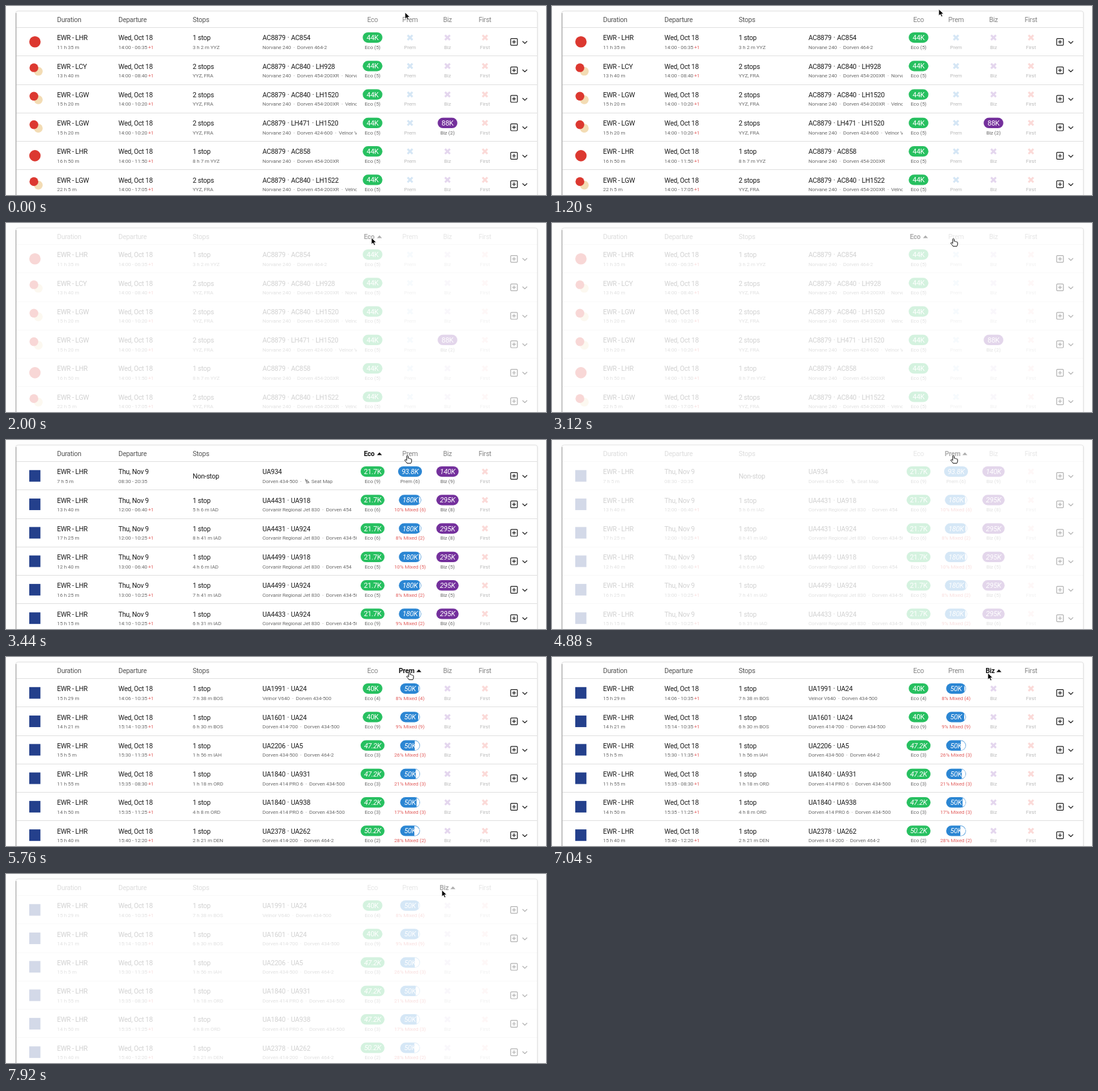
Recreate the animation shown at these times as an HTML page. Size 836 px wide and 294 px high, loop 8000 ms.

```html
<!DOCTYPE html>
<html lang="en">
<head>
<meta charset="utf-8">
<title>Flight results sorting</title>
<style>
  html, body { margin: 0; width: 100%; height: 100%; overflow: hidden; background: #fdfdfd; }
  svg { display: block; width: 836px; height: 294px; }
  text { font: 10.5px Roboto, sans-serif; letter-spacing: -.25px; fill: #1c1c1c; white-space: pre; }
  .sub { font-size: 8px; letter-spacing: -.1px; fill: #6c6c6c; }
  .mid { text-anchor: middle; }
  .plus, .mixed { fill: #e2605f; }
  .flights { word-spacing: .6px; }
  .head { fill: #555; }
  .cabin { fill: #858585; }
  .sorted { font-weight: 700; fill: #111; }
  .off { fill: #bcbcbc; }
  .price { fill: #fff; font-size: 11px; }
  .it { font-style: italic; }
  .line { stroke: #e0e0e0; }
  .icon { fill: none; stroke: #222; stroke-width: 1.2; }
</style>
</head>
<body>
<svg viewBox="0 0 836 294">
  <defs>
    <clipPath id="planes"><rect x="390" y="0" width="153" height="294"/></clipPath>
    <filter id="soft" x="-5%" y="-5%" width="110%" height="110%"><feGaussianBlur stdDeviation="1.2"/></filter>
  </defs>
  <rect x="15.5" y="8.5" width="807" height="310" rx="3" fill="#999" opacity=".45" filter="url(#soft)"/>
  <rect x="15.5" y="8" width="807" height="310" rx="3" fill="#fff" stroke="#dedede" stroke-width=".8"/>
  <path d="M15.6 11V294" stroke="#9a9a9a"/>
  <g id="body"></g>
  <rect id="veil" x="16.2" y="8.6" width="805.8" height="290" rx="2.5" fill="#fff"/>
  <g id="top"></g>
  <g id="cursor" stroke-linejoin="round">
    <path id="arrow" transform="translate(.8 1)" d="M0 0V10.2L2.4 8L4.1 11.8L5.9 11L4.2 7.3H7.5Z" fill="#000" stroke="#fff" stroke-width=".8"/>
    <path id="hand" d="M-1.2 1Q0-.6 1.1 1V4.4Q2.4 3.7 3 4.9Q4.4 4.4 4.8 5.5Q6.3 5.1 6.4 6.8V9Q6.2 10.6 5.3 12.2H-.6Q-1.6 10.4-3.8 8.2Q-4.6 6.8-3.2 6.6Q-2.2 6.6-1.2 7.8Z" fill="#fff" stroke="#111" stroke-width="1"/>
  </g>
</svg>
<script>
const $ = id => document.getElementById(id);
const LOOP = 8000, HEAD = 33.5, PITCH = 44.27;

const cabins = [
  { name: 'Eco', x: 567.5, start: 554, tri: 574.3, fill: '#27c060' },
  { name: 'Prem', x: 625.5, start: 608, tri: 635.3, fill: '#2b86d3', off: '#d5e6f5' },
  { name: 'Biz', x: 683.5, start: 671.3, tri: 688, fill: '#74309c', off: '#e4d6ee' },
  { name: 'First', x: 741.5, off: '#fbdad8' }
];

const planes = {
  N: 'Norvane 240', D: 'Dorven 454', D2: 'Dorven 454-200XR', D3: 'Dorven 464-2',
  D4: 'Dorven 424-600', D5: 'Dorven 434-500', D7: 'Dorven 414-700', D8: 'Dorven 414-200',
  DP: 'Dorven 414 PRO 6', V: 'Velnor V640', C: 'Corvanir Regional Jet 830', S: '      Seat Map'
};

// to | length | times | stops | layover | flights | planes | eco | prem | biz
// fare: price, seats, mixed percent; "/" marks an italic price
const tables = [
  { date: 'Wed, Oct 18', rows: [
    'LHR|11 h 35 m|14:00 - 06:35+|1 stop|3 h 2 m YYZ|AC8879 · AC854|N D3|44K 5',
    'LCY|13 h 40 m|14:00 - 08:40+|2 stops|YYZ, FRA|AC8879 · AC840 · LH928|N D2 N|44K 5',
    'LGW|15 h 20 m|14:00 - 10:20+|2 stops|YYZ, FRA|AC8879 · AC840 · LH1520|N D2 V|44K 5',
    'LGW|15 h 20 m|14:00 - 10:20+|2 stops|YYZ, FRA|AC8879 · LH471 · LH1520|N D4 V|44K 5||88K 2',
    'LHR|16 h 50 m|14:00 - 11:50+|1 stop|8 h 7 m YYZ|AC8879 · AC858|N D2|44K 5',
    'LGW|22 h 5 m|14:00 - 17:05+|2 stops|YYZ, FRA|AC8879 · AC840 · LH1522|N D2 V|44K 5'] },
  { date: 'Thu, Nov 9', rows: [
    'LHR|7 h 5 m|08:30 - 20:35|Non-stop||UA934|D5 S|21.7K 9|/93.8K 6|/140K 9',
    'LHR|13 h 40 m|12:00 - 06:40+|1 stop|5 h 6 m IAD|UA4431 · UA918|C D|21.7K 6|/180K 6 10|/295K 8',
    'LHR|17 h 25 m|12:00 - 10:25+|1 stop|8 h 41 m IAD|UA4431 · UA924|C D5|21.7K 6|/180K 2 8|/295K 8',
    'LHR|12 h 40 m|13:00 - 06:40+|1 stop|4 h 6 m IAD|UA4499 · UA918|C D|21.7K 5|/180K 5 10|/295K 5',
    'LHR|16 h 25 m|13:00 - 10:25+|1 stop|7 h 41 m IAD|UA4499 · UA924|C D5|21.7K 5|/180K 2 8|/295K 5',
    'LHR|15 h 15 m|14:10 - 10:25+|1 stop|6 h 31 m IAD|UA4433 · UA924|C D5|21.7K 9|/180K 2 9|/295K 6'] },
  { date: 'Wed, Oct 18', rows: [
    'LHR|15 h 29 m|14:06 - 10:35+|1 stop|7 h 38 m BOS|UA1991 · UA24|V D5|40K 4|/50K 4 8',
    'LHR|14 h 21 m|15:14 - 10:35+|1 stop|6 h 30 m BOS|UA1601 · UA24|D7 D5|40K 9|/50K 9 9',
    'LHR|15 h 5 m|15:30 - 11:35+|1 stop|1 h 56 m IAH|UA2206 · UA5|D5 D3|/47.2K 3|/50K 3 26',
    'LHR|11 h 55 m|15:35 - 08:30+|1 stop|1 h 18 m ORD|UA1840 · UA931|DP D5|/47.2K 3|/50K 3 21',
    'LHR|14 h 50 m|15:35 - 11:25+|1 stop|4 h 8 m ORD|UA1840 · UA938|DP D5|/47.2K 3|/50K 3 17',
    'LHR|15 h 40 m|15:40 - 12:20+|1 stop|2 h 21 m DEN|UA2378 · UA262|D8 D3|/50.2K 2|/50K 2 28'] }
];

const text = (x, y, s, cls = '', extra = '') => `<text x="${x}" y="${y}" class="${cls}" ${extra}>${s}</text>`;

function logo(y, flights) {
  if (flights.startsWith('UA')) return `<rect x="36" y="${y - 9}" width="17.3" height="18" fill="#24408c"/>`;
  if (!flights.includes('LH')) return `<circle cx="44.8" cy="${y}" r="8.8" fill="#dc3830"/>`;
  return `<circle cx="50" cy="${y + 1.5}" r="6.8" fill="#f3dcb4"/><circle cx="43.2" cy="${y - 4}" r="6.8" fill="#dc3830"/>`;
}

function fare(cabin, spec, top) {
  const { x, name, fill, off } = cabin;
  if (!spec) {
    return `<path d="M${x - 3.8} ${top + 11.8}l7.6 7.6m0-7.6l-7.6 7.6" stroke="${off}" stroke-width="3.1"/>` +
      text(x, top + 33.2, name, 'sub mid off');
  }
  const [price, seats, mixed] = spec.replace('/', '').split(' ');
  const w = { 3: 30.5, 4: 34.5, 5: 37 }[price.length], h = 16.2, r = h / 2;
  const left = x - w / 2, y = top + 7.5, mid = y + r;
  let pill = `<rect x="${left}" y="${y}" width="${w}" height="${h}" rx="${r}" fill="${fill}"/>`;
  if (mixed) {
    const cut = w * (1 - mixed / 100), inner = r - .6;
    const bend = Math.sqrt(Math.max(0, inner ** 2 - Math.max(0, cut - w + r) ** 2));
    const from = left + Math.max(cut, w - r);
    pill += `<path d="M${left + cut} ${mid - bend}H${from}A${inner} ${inner} 0 0 1 ${from} ${mid + bend}H${left + cut}Z" fill="#fff"/>`;
  }
  return pill + text(x, top + 19.6, price, 'price mid' + (spec[0] === '/' ? ' it' : '')) +
    text(x, top + 33.2, `${mixed ? mixed + '% Mixed' : name} (${seats})`, 'sub mid' + (mixed ? ' mixed' : ''));
}

function row(spec, i, date) {
  const [to, length, times, stops, layover, flights, craft, ...fares] = spec.split('|');
  const top = HEAD + PITCH * i, main = top + 19.8, sub = top + 33.2;
  const next = times.endsWith('+') ? '<tspan class="plus" dx="1.2">+1</tspan>' : '';
  const seat = craft.endsWith('S')
    ? `<path d="M463.5 ${sub - 6}l1.4 4h3.4l.8 2.4M465 ${sub - 4}h2.4M464.6 ${sub}h3" fill="none" stroke="#666" stroke-width="1.1"/>` : '';
  return logo(top + 22.3, flights) +
    text(79, main, 'EWR - ' + to) + text(79, sub, length, 'sub') +
    text(174, main, date) + text(174, sub, times.replace('+', '') + next, 'sub') +
    text(289, layover ? main : top + 26.3, stops) + text(289, sub, layover, 'sub') +
    text(397, main, flights, 'flights') +
    text(397, sub, craft.split(' ').map(k => planes[k]).join('  ·  '), 'sub', 'clip-path="url(#planes)"') + seat +
    cabins.map((c, k) => fare(c, fares[k], top)).join('');
}

function build() {
  let body = '', top = '';
  for (let i = 0; i < 6; i++) {
    const y = HEAD + PITCH * i, mid = y + 22.4;
    body += `<path class="line" d="M16 ${Math.floor(y) + .5}H822"/>`;
    top += `<rect class="icon" x="781.3" y="${mid - 5.3}" width="10.4" height="10.6" rx="1.4"/>` +
      `<path class="icon" d="M783.6 ${mid}h5.8m-2.9-2.9v5.8M799.6 ${mid - 1.2}l3.6 3.4l3.6-3.4"/>`;
  }
  body += text(79, 24.7, 'Duration', 'head') + text(174, 24.7, 'Departure', 'head') + text(289, 24.7, 'Stops', 'head');
  cabins.forEach((c, i) => {
    body += text(c.x, 24.7, c.name, 'cabin mid', `id="plain${i}"`);
    if (c.start) {
      top += `<g id="sort${i}">${text(c.start, 24.7, c.name, 'sorted')}` +
        `<path d="M${c.tri} 23.4l3.9-4.2l3.9 4.2Z" fill="#111"/></g>`;
    }
  });
  tables.forEach((t, i) => {
    body += `<g id="table${i}">${t.rows.map((r, k) => row(r, k, t.date)).join('')}</g>`;
  });
  $('body').innerHTML = body;
  $('top').innerHTML = top;
}

const path = [
  [0, 617, 9], [900, 616, 10], [1200, 598, 4], [1560, 565, 22], [2520, 565, 22], [3000, 621.5, 24],
  [4960, 621.5, 24], [5400, 624.5, 23], [5920, 624.5, 23], [6200, 648, 6], [6560, 674, 24], [LOOP, 674, 24]
];
const clicks = [1600, 4400, 6680];
const loads = [3200, 5120];
const veils = [[1800, 3200], [4640, 5120], [7060, 9000]];

const clamp = v => Math.min(1, Math.max(0, v));
const ease = v => v * v * (3 - 2 * v);
const passed = (list, t) => list.filter(v => t >= v).length;
const show = (id, on) => $(id).style.display = on ? '' : 'none';

function position(t) {
  const i = path.findIndex(p => p[0] > t);
  const [t0, x0, y0] = path[i - 1], [t1, x1, y1] = path[i];
  const k = ease((t - t0) / (t1 - t0));
  return [x0 + (x1 - x0) * k, y0 + (y1 - y0) * k];
}

function update(t) {
  const sorted = passed(clicks, t) - 1, table = passed(loads, t);
  cabins.forEach((c, i) => {
    show('plain' + i, i !== sorted);
    if (c.start) show('sort' + i, i === sorted);
  });
  tables.forEach((_, i) => show('table' + i, i === table));

  const fade = Math.max(...veils.map(([on, off]) => ease(clamp((t - on) / 200)) * (1 - clamp((t - off) / 160))));
  $('veil').setAttribute('opacity', .8 * fade);
  $('top').setAttribute('opacity', 1 - .66 * fade);

  const hand = t >= 2880 && t < 6060;
  show('hand', hand);
  show('arrow', !hand);
  $('cursor').setAttribute('transform', `translate(${position(t)})`);
}

build();
const begin = performance.now();
function tick() {
  update((performance.now() - begin) % LOOP);
  requestAnimationFrame(tick);
}
tick();
</script>
</body>
</html>
```
